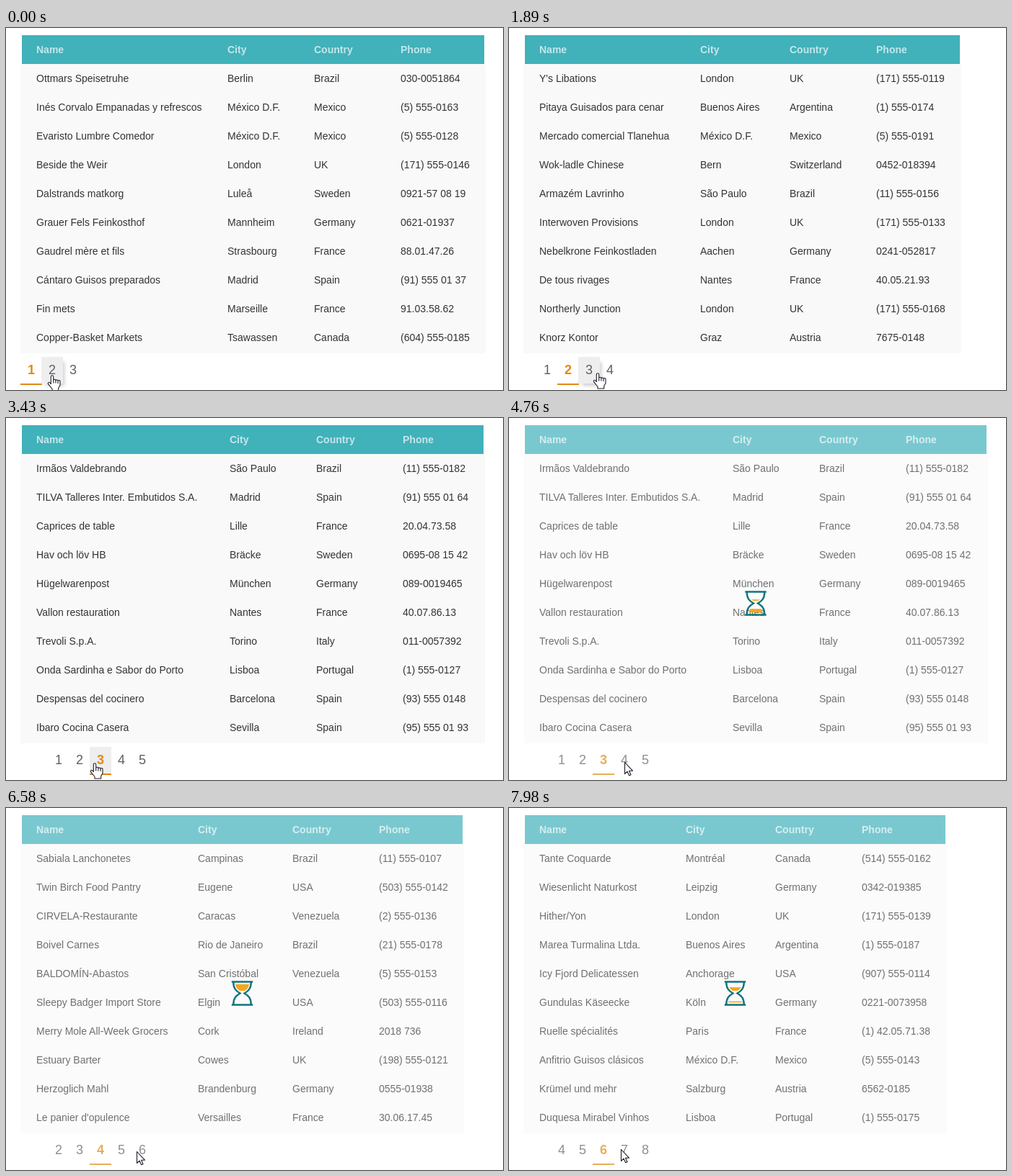
An HTML page that plays this animation: 689x503 px, repeating every 8000 ms.

```html
<!DOCTYPE html>
<html lang="en">
<head>
<meta charset="utf-8">
<title>Paged customer table</title>
<style>
  html, body { margin: 0; width: 100%; height: 100%; overflow: hidden; background: #fff; }
  #stage { position: relative; width: 689px; height: 503px; overflow: hidden;
    font: 14px/40px "Liberation Sans", Arial, sans-serif; color: #333; }
  #view.busy { opacity: .7; }
  .page { position: absolute; left: 22px; top: 10px; }
  .page::before { content: ""; position: absolute; inset: 40px -2px -2px; background: #f9f9f9; }
  .row { position: relative; display: grid; height: 40px; white-space: nowrap; }
  .row span { padding-left: 20px; }
  .head { background: #41b1ba; color: #c3e7ea; font-weight: bold; }
  .pager { position: absolute; top: 457px; display: flex; font-size: 18px; line-height: 37px; color: #5f5f66; }
  .pager b { flex: none; width: 30px; height: 37px; margin-right: -1px; text-align: center; font-weight: normal; }
  .pager .hover { background: #eee; box-shadow: 4px 5px 5px -2px rgba(0, 0, 0, .2); }
  .pager .active { color: #e08a12; font-weight: bold; border-bottom: 2px solid #e08a12; box-shadow: none; }
  [hidden] { display: none !important; }
  svg { position: absolute; left: 0; top: 0; overflow: visible; }
</style>
</head>
<body>
<div id="stage">
  <div id="view"></div>
  <svg width="1" height="1">
    <defs>
      <clipPath id="upper"><path d="M-9.5-13H9.5C9-8 6-4.5 3-3.5H-3C-6-4.5-9-8-9.5-13Z"/></clipPath>
      <clipPath id="lower"><path d="M-9.5 13H9.5C9 8 6 4.5 3 3.5H-3C-6 4.5-9 8-9.5 13Z"/></clipPath>
    </defs>
    <g id="glass">
      <g fill="#f4a71d">
        <g clip-path="url(#upper)"><rect id="top" x="-12" y="-13" width="24" height="12"/></g>
        <g clip-path="url(#lower)"><rect id="low" x="-12" y="13" width="24" height="12"/></g>
      </g>
      <path fill="none" stroke="#11737f" stroke-width="2.4" d="M-14.7-16H14.7M-14.7 16H14.7
        M-12.3-16C-12.3-7-9-3.5-3 0C-9 3.5-12.3 7-12.3 16M12.3-16C12.3-7 9-3.5 3 0C9 3.5 12.3 7 12.3 16"/>
    </g>
    <g id="cursor" fill="#fff" stroke="#1c1c28" stroke-width="1.1" stroke-linejoin="round">
      <path id="arrow" d="M.5 .5V16.5L4 13.2 6.6 18.8 9 17.8 6.5 12.2H11.4Z"/>
      <path id="hand" transform="translate(-1 .5)" d="M-1.7 12V1.9a1.7 1.7 0 0 1 3.4 0V7.2a1.6 1.6 0 0 1 3.2 .3a1.6 1.6 0 0 1 3.1 .7a1.5 1.5 0 0 1 3 .8V14L8.7 18V21.5H0V19L-5.4 12.2c-1-2 1-3 2-2Z
        M1.7 7V11M4.9 7.5V11M8 8.2V11.5"/>
    </g>
  </svg>
</div>
<script>
const LOOP = 8000, STEP = 70, CELL = 29;
const $ = id => document.getElementById(id);

const pages = [
  { at: 0, cols: [265, 120, 120, 136], left: 20, first: 1, count: 3, active: 1, rows: `
Ottmars Speisetruhe|Berlin|Brazil|030-0051864
Inés Corvalo Empanadas y refrescos|México D.F.|Mexico|(5) 555-0163
Evaristo Lumbre Comedor|México D.F.|Mexico|(5) 555-0128
Beside the Weir|London|UK|(171) 555-0146
Dalstrands matkorg|Luleå|Sweden|0921-57 08 19
Grauer Fels Feinkosthof|Mannheim|Germany|0621-01937
Gaudrel mère et fils|Strasbourg|France|88.01.47.26
Cántaro Guisos preparados|Madrid|Spain|(91) 555 01 37
Fin mets|Marseille|France|91.03.58.62
Copper-Basket Markets|Tsawassen|Canada|(604) 555-0185` },
  { at: 1120, cols: [223, 124, 120, 136], left: 38, first: 1, count: 4, active: 2, rows: `
Y's Libations|London|UK|(171) 555-0119
Pitaya Guisados para cenar|Buenos Aires|Argentina|(1) 555-0174
Mercado comercial Tlanehua|México D.F.|Mexico|(5) 555-0191
Wok-ladle Chinese|Bern|Switzerland|0452-018394
Armazém Lavrinho|São Paulo|Brazil|(11) 555-0156
Interwoven Provisions|London|UK|(171) 555-0133
Nebelkrone Feinkostladen|Aachen|Germany|0241-052817
De tous rivages|Nantes|France|40.05.21.93
Northerly Junction|London|UK|(171) 555-0168
Knorz Kontor|Graz|Austria|7675-0148` },
  { at: 3010, cols: [268, 120, 120, 132], left: 58, first: 1, count: 5, active: 3, rows: `
Irmãos Valdebrando|São Paulo|Brazil|(11) 555-0182
TILVA Talleres Inter. Embutidos S.A.|Madrid|Spain|(91) 555 01 64
Caprices de table|Lille|France|20.04.73.58
Hav och löv HB|Bräcke|Sweden|0695-08 15 42
Hügelwarenpost|München|Germany|089-0019465
Vallon restauration|Nantes|France|40.07.86.13
Trevoli S.p.A.|Torino|Italy|011-0057392
Onda Sardinha e Sabor do Porto|Lisboa|Portugal|(1) 555-0127
Despensas del cocinero|Barcelona|Spain|(93) 555 0148
Ibaro Cocina Casera|Sevilla|Spain|(95) 555 01 93` },
  { at: 4830, cols: [224, 131, 120, 136], left: 58, first: 2, count: 5, active: 4, rows: `
Sabiala Lanchonetes|Campinas|Brazil|(11) 555-0107
Twin Birch Food Pantry|Eugene|USA|(503) 555-0142
CIRVELA-Restaurante|Caracas|Venezuela|(2) 555-0136
Boivel Carnes|Rio de Janeiro|Brazil|(21) 555-0178
BALDOMÍN-Abastos|San Cristóbal|Venezuela|(5) 555-0153
Sleepy Badger Import Store|Elgin|USA|(503) 555-0116
Merry Mole All-Week Grocers|Cork|Ireland|2018 736
Estuary Barter|Cowes|UK|(198) 555-0121
Herzoglich Mahl|Brandenburg|Germany|0555-01938
Le panier d'opulence|Versailles|France|30.06.17.45` },
  { at: 6650, cols: [203, 124, 120, 136], left: 58, first: 4, count: 5, active: 6, rows: `
Tante Coquarde|Montréal|Canada|(514) 555-0162
Wiesenlicht Naturkost|Leipzig|Germany|0342-019385
Hither/Yon|London|UK|(171) 555-0139
Marea Turmalina Ltda.|Buenos Aires|Argentina|(1) 555-0187
Icy Fjord Delicatessen|Anchorage|USA|(907) 555-0114
Gundulas Käseecke|Köln|Germany|0221-0073958
Ruelle spécialités|Paris|France|(1) 42.05.71.38
Anfitrio Guisos clásicos|México D.F.|Mexico|(5) 555-0143
Krümel und mehr|Salzburg|Austria|6562-0185
Duquesa Mirabel Vinhos|Lisboa|Portugal|(1) 555-0175` }
];

// Loading spans; the sand runs only between flow and still.
const loads = [
  { from: 140, to: 1120, flow: 420, still: 1120 },
  { from: 2100, to: 3430, flow: 2100, still: 3010 },
  { from: 4060, to: 4830, flow: 4060, still: 4830 },
  { from: 5670, to: 6650, flow: 5670, still: 6650 },
  { from: 7560, to: LOOP, flow: 7560, still: LOOP }
];

// Pointer keys: time, x, y
const path = [
  [0, 65, 482], [1540, 65, 482], [1890, 124, 479], [3430, 124, 479], [3920, 160, 478],
  [5180, 160, 478], [5460, 181, 477], [6930, 181, 477], [7140, 128, 476], [7280, 155, 474], [LOOP, 155, 474]
];

function add(parent, tag, cls, text = "") {
  const el = document.createElement(tag);
  el.className = cls;
  el.textContent = text;
  return parent.appendChild(el);
}

for (const p of pages) {
  p.width = p.cols.reduce((a, b) => a + b);
  p.box = add($("view"), "div", "");
  const table = add(p.box, "div", "page");
  table.style.width = p.width + "px";
  ["Name|City|Country|Phone", ...p.rows.trim().split("\n")].forEach((line, i) => {
    const row = add(table, "div", i ? "row" : "row head");
    row.style.gridTemplateColumns = p.cols.map(c => c + "px").join(" ");
    line.split("|").forEach(cell => add(row, "span", "", cell));
  });
  const pager = add(p.box, "div", "pager");
  pager.style.left = p.left + "px";
  p.cells = Array.from({ length: p.count }, (_, i) =>
    add(pager, "b", p.first + i === p.active ? "active" : "", p.first + i));
}

function pointer(t) {
  const i = path.findIndex(k => k[0] > t);
  const [t0, x0, y0] = path[i - 1], [t1, x1, y1] = path[i];
  const k = (t - t0) / (t1 - t0);
  return [x0 + (x1 - x0) * k, y0 + (y1 - y0) * k];
}

function draw(now) {
  const t = Math.floor(now % LOOP / STEP) * STEP;
  const page = pages.filter(p => p.at <= t).pop();
  const load = loads.find(l => t >= l.from && t < l.to);
  const [x, y] = pointer(t);

  pages.forEach(p => p.box.hidden = p !== page);
  $("view").className = load ? "busy" : "";
  const over = load ? -1 : Math.floor((x - page.left) / CELL);
  page.cells.forEach((c, i) => c.classList.toggle("hover", i === over));

  $("cursor").setAttribute("transform", `translate(${x} ${y})`);
  $("arrow").style.display = load ? "" : "none";
  $("hand").style.display = load ? "none" : "";

  $("glass").style.display = load ? "" : "none";
  if (load) {
    const run = Math.max(0, Math.min(t, load.still) - load.flow);
    const k = run % 910 / 910;
    $("glass").setAttribute("transform", `translate(${22 + page.width / 2} 257.5)`);
    $("top").setAttribute("y", -13 + 10 * k);
    $("low").setAttribute("y", 13 - 9 * k * k);
  }
}

let start;
function tick(now) {
  start ??= now;
  draw(now - start);
  requestAnimationFrame(tick);
}
draw(0);
requestAnimationFrame(tick);
</script>
</body>
</html>
```
